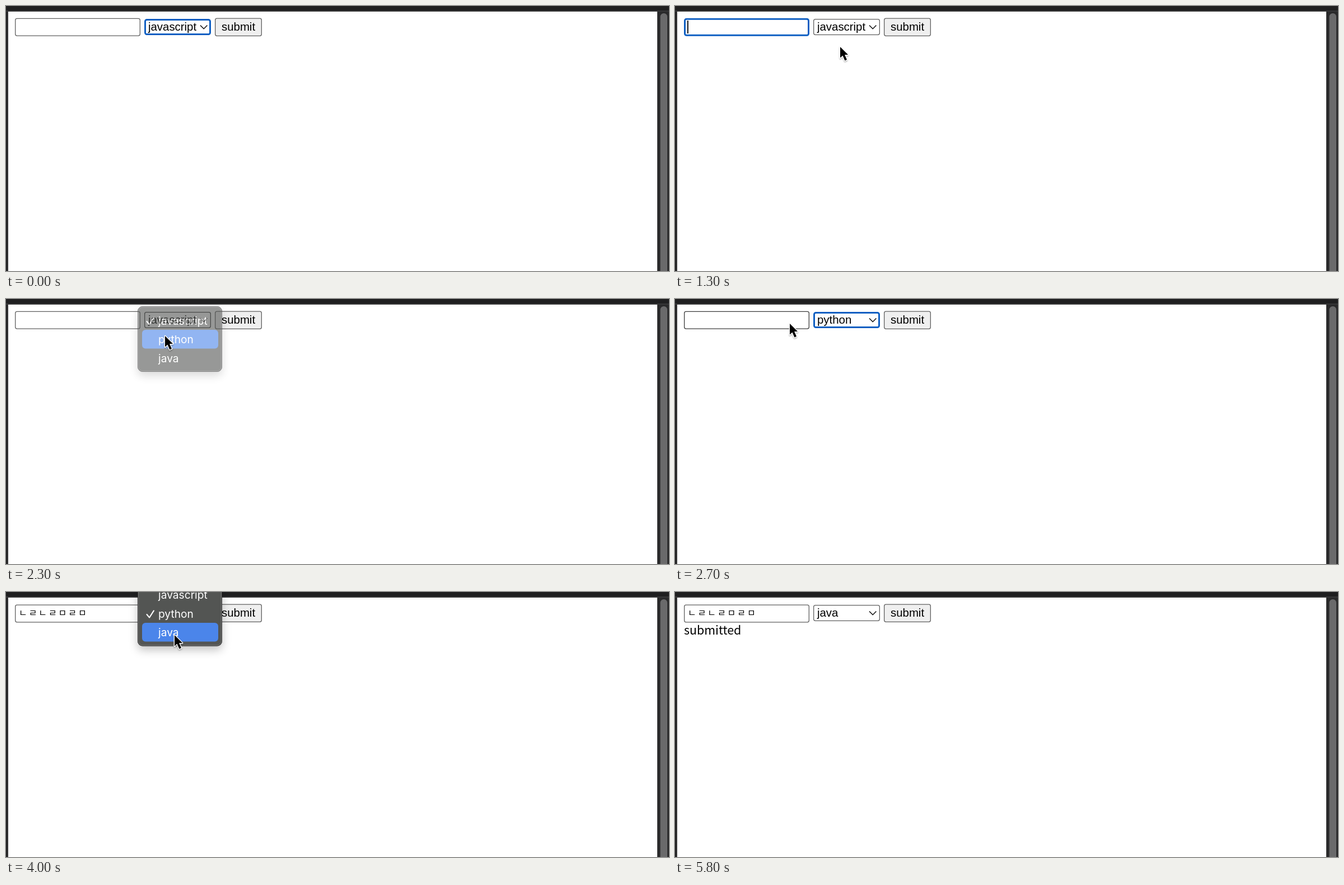
Write an HTML page that moves like this. It is 1184 px wide and 473 px high and loops after 5880 ms.

```html
<!DOCTYPE html>
<html lang="ko">
<head>
<meta charset="utf-8">
<title>Form</title>
<style>
html, body { margin: 0; width: 100%; height: 100%; overflow: hidden; background: #fff; }
svg { display: block; width: 100%; height: 100%; }
text { font: 20.4px "Liberation Sans", Arial, sans-serif; white-space: pre; }
#menu text { font: 19.2px Inter, Roboto, sans-serif; fill: #fff; }
#value { font: 500 16px "Noto Sans CJK KR", "Noto Sans CJK JP", "Noto Sans CJK", sans-serif; letter-spacing: 2.93px; }
#done { font: 21.4px "Noto Sans CJK KR", "Noto Sans CJK JP", "Noto Sans", sans-serif; }
</style>
</head>
<body>
<svg viewBox="0 0 1184 473">
  <defs>
    <filter id="soft" x="-30%" y="-30%" width="160%" height="170%">
      <feDropShadow dx="0" dy="7" stdDeviation="8" flood-opacity=".24"/>
    </filter>
    <filter id="lift" x="-40%" y="-30%" width="190%" height="170%">
      <feDropShadow dx="0" dy="1.5" stdDeviation="1.2" flood-opacity=".35"/>
    </filter>
  </defs>

  <rect width="1184" height="473" fill="#1f1f20"/>
  <rect y="8" width="1184" height="2" fill="#373738"/>
  <rect x="2" y="8" width="2" height="465" fill="#373738"/>
  <rect x="4" y="10" width="1159" height="463" fill="#fff"/>
  <rect x="1163" y="10" width="21" height="463" fill="#2a2a2b"/>
  <rect x="1168.5" y="13" width="12.5" height="480" rx="6.2" fill="#6a6a6b"/>

  <rect id="input" x="16" y="22" width="224" height="32"/>
  <text id="value" x="23" y="43"></text>
  <rect id="mark" y="45.5" width="16" height="2.2"/>
  <rect id="caret" y="26" width="1.8" height="23"/>

  <rect id="select" x="247" y="23" width="119" height="29"/>
  <text id="choice" x="254" y="44"></text>
  <path d="M347 34.5l6.2 6.2 6.2-6.2" fill="none" stroke="#111" stroke-width="1.6"/>

  <rect id="button" x="373" y="21.5" width="84" height="32.5"/>
  <text x="385" y="44">submit</text>
  <text id="done" x="16" y="76">submitted</text>

  <g id="menu">
    <rect width="151" height="117" rx="9" fill="#535453" filter="url(#soft)"/>
    <rect x=".5" y=".5" width="150" height="116" rx="8.5" fill="none" stroke="#303030"/>
    <rect x="1.5" y="1.5" width="148" height="114" rx="7.5" fill="none" stroke="#777"/>
    <rect id="pick" x="8" width="136" height="33.5" rx="6" fill="#4b85ea"/>
    <path id="check" d="M16.5 27l4.6 5.6 7.8-12.2" fill="none" stroke="#fff" stroke-width="2" stroke-linecap="round" stroke-linejoin="round"/>
    <text x="37" y="32.6">javascript</text>
    <text x="37" y="66">python</text>
    <text x="37" y="99.5">java</text>
  </g>

  <g id="cursor" filter="url(#lift)">
    <path d="M0 0V19.6L4.5 15.4 8.4 24.4 12 22.8 8.1 14.1H14.1Z" fill="#000" stroke="#fff" stroke-width="2.6" paint-order="stroke" stroke-linejoin="round"/>
  </g>
</svg>
<script>
const LOOP = 5880, STEP = 100, ROW = 33.45;
const $ = id => document.getElementById(id);
const set = (id, attrs) => { for (const k in attrs) $(id).setAttribute(k, attrs[k]); };
const show = (id, on) => set(id, { visibility: on ? 'visible' : 'hidden' });

const langs = ['javascript', 'python', 'java'];
const typed = 'ㄴㄹㄴㄹㅁㄹㅁ';
const menus = [
  { open: 1600, close: 2300, checked: 0 },
  { open: 3700, close: 4400, checked: 1 }
];
const focusSteps = [
  [0, 'select'], [800, 'input'], [1600, ''], [2500, 'select'],
  [2800, 'input'], [3700, ''], [4600, 'select'], [5000, '']
];
// time, x, y of the pointer tip
const path = [
  [300, 394, 72], [500, 290, 62], [700, 190, 44], [800, 190, 44], [1000, 250, 90],
  [1100, 293, 75], [1300, 295, 73], [1500, 291, 46], [1700, 289, 40], [1900, 287, 48],
  [2100, 285, 64], [2300, 284, 66], [2500, 268, 63], [2700, 205, 44], [2900, 205, 45],
  [3100, 228, 69], [3400, 271, 42], [3600, 282, 39], [3800, 288, 46], [4000, 301, 77],
  [4100, 302, 79], [4500, 302, 79], [4600, 350, 68], [4700, 400, 50], [4800, 420, 43],
  [5600, 420, 43], [5700, 432, 2]
];

const stepAt = (list, t) => list.filter(s => s[0] <= t).pop()[1];

function pointer(t) {
  const i = path.findIndex(p => p[0] > t);
  if (i < 0) return path[path.length - 1].slice(1);
  if (i === 0) return path[0].slice(1);
  const a = path[i - 1], b = path[i], k = (t - a[0]) / (b[0] - a[0]);
  return [1, 2].map(n => a[n] + (b[n] - a[n]) * k);
}

// Control frame, drawn inside its outer box
function frame(id, x, y, w, h, focused, hover, fill = '#fff') {
  const line = focused ? 3 : 1.3;
  set(id, {
    x: x + line / 2, y: y + line / 2, width: w - line, height: h - line, rx: 3,
    fill, stroke: focused ? '#0f5fc2' : hover ? '#3c3c3c' : '#606060', 'stroke-width': line
  });
}

function draw(time) {
  const t = Math.floor((time % LOOP) / STEP) * STEP;
  const [cx, cy] = pointer(t);
  const visible = t >= 300 && t < 5800;
  const menu = menus.find(m => t >= m.open && t < m.close + 200);
  const focus = stepAt(focusSteps, t);
  const over = (x, y, w, h) => visible && !menu && cx >= x && cx <= x + w && cy >= y && cy <= y + h;

  const count = Math.max(0, Math.min(typed.length, (t - 2900) / STEP));
  const typing = focus === 'input';
  const end = count ? 21.5 + 17.65 * count : 22;
  frame('input', 16, count ? 22.5 : 21.7, 224, 32, typing, over(16, 22, 224, 32));
  $('value').textContent = typed.slice(0, count);
  set('caret', { x: end });
  set('mark', { x: end - 16 });
  show('caret', typing);
  show('mark', typing && count > 0);

  frame('select', 247, 23, 119, 29, focus === 'select', menu || over(247, 23, 119, 29));
  $('choice').textContent = langs[t < 2500 ? 0 : t < 4600 ? 1 : 2];

  const hot = over(373, 21, 84, 33), down = t >= 5000 && t < 5200;
  frame('button', 373, 21.5, 84, 32.5, false, hot, down ? '#f5f5f5' : hot ? '#e5e5e5' : '#efefef');
  show('done', t >= 5200);

  set('menu', { display: menu ? 'inline' : 'none' });
  if (menu) {
    const top = 13 - ROW * menu.checked;
    const row = Math.max(0, Math.min(2, Math.floor((cy - top - 8) / ROW)));
    const fade = t < menu.close ? 1 : 0.6 - (t - menu.close) * 0.004;
    set('menu', { transform: `translate(235 ${top})`, opacity: fade });
    set('pick', { y: 8.5 + ROW * row });
    set('check', { transform: `translate(0 ${ROW * menu.checked})` });
  }

  set('cursor', { transform: `translate(${cx} ${cy})` });
  show('cursor', visible);
}

const start = performance.now();
function tick() {
  draw(performance.now() - start);
  requestAnimationFrame(tick);
}
tick();
</script>
</body>
</html>
```
